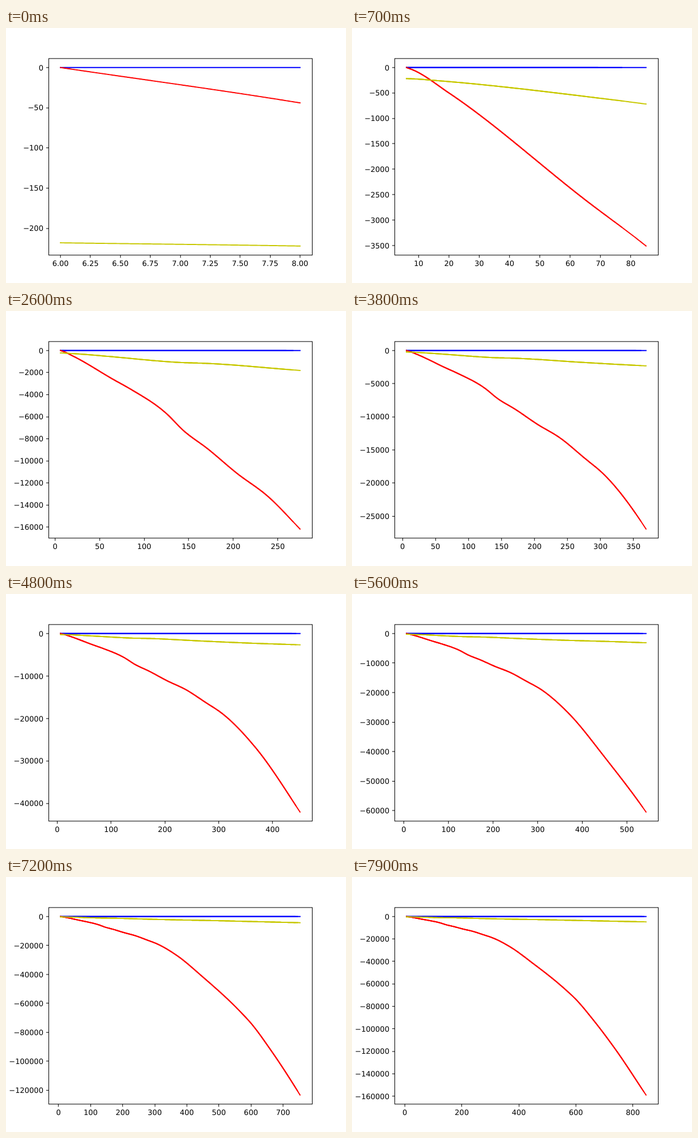
These frames come from a looping animation (600 px wide and 450 px high, 8000 ms). An HTML page:

```html
<!DOCTYPE html>
<html lang="en">
<head>
<meta charset="utf-8">
<title>Growing line chart</title>
<style>
  html, body { margin: 0; width: 100%; height: 100%; overflow: hidden; background: #fff; }
  svg { display: block; width: 600px; height: 450px; }
  text { font: 13.89px "DejaVu Sans", sans-serif; text-rendering: geometricPrecision; fill: #000; }
  .axis { fill: none; stroke: #000; stroke-width: 1.1; }
  .line { fill: none; stroke-width: 2.08; stroke-linejoin: round; stroke-linecap: square; }
</style>
</head>
<body>
<svg viewBox="0 0 640 480">
  <g id="lines"></g>
  <g id="ticks"></g>
  <rect class="axis" x="80.5" y="57.5" width="496" height="370"/>
</svg>
<script>
const FRAME_MS = 100, FRAMES = 80;
const BOX = { left: 80, right: 576, top: 57.6, bottom: 427.2 };
const START = 6, SAMPLES = 160;

// Smooth curve through key points, with tangents weighted by spacing
function curve(points) {
  const chord = i => (points[i + 1][1] - points[i][1]) / (points[i + 1][0] - points[i][0]);
  const last = points.length - 1;
  const slopes = points.map(([x], i) => {
    if (i === 0) return chord(0);
    if (i === last) return chord(last - 1);
    const before = x - points[i - 1][0], after = points[i + 1][0] - x;
    return (chord(i - 1) * after + chord(i) * before) / (before + after);
  });
  return x => {
    let i = 0;
    while (i < last - 1 && points[i + 1][0] < x) i++;
    const [x0, y0] = points[i], [x1, y1] = points[i + 1];
    const h = x1 - x0, t = (x - x0) / h, u = 1 - t;
    return u * u * ((1 + 2 * t) * y0 + t * h * slopes[i]) +
           t * t * ((1 + 2 * u) * y1 - u * h * slopes[i + 1]);
  };
}

// Right end of the data by frame
const endAt = curve([[0, 8], [15, 171], [26, 275], [38, 369], [48, 451], [65, 661], [79, 846]]);

const red = curve([
  [6, 0], [8, -44], [20, -500], [66, -2650], [85, -3510], [125, -5710], [144, -7240],
  [171, -8881], [204, -11110], [239, -13215], [275, -16167], [307, -18880], [369, -26947],
  [451, -42007], [562, -64700], [601, -74000], [661, -92060], [740, -118700], [846, -158940]
]);
const yellow = curve([
  [6, -218], [8, -222], [17, -262], [73, -627], [105, -870], [136, -1064], [171, -1168],
  [275, -1804], [369, -2314], [451, -2661], [661, -3785], [846, -4770]
]);
const SERIES = [
  { color: "#0000ff", at: () => 0 },
  { color: "#ff0000", at: red },
  { color: "#c8c800", at: yellow }
];

const linesEl = document.getElementById("lines");
const ticksEl = document.getElementById("ticks");

// Data range with 5% margins, mapped to pixels
function makeScale(min, max, from, to) {
  const pad = (max - min) * 0.05, lo = min - pad, hi = max + pad;
  return { lo, hi, map: v => from + (to - from) * (v - lo) / (hi - lo) };
}

// Round tick values, at most nine intervals
function tickList({ lo, hi }) {
  const raw = (hi - lo) / 9;
  const base = 10 ** Math.floor(Math.log10(raw));
  const step = base * [1, 2, 2.5, 5, 10].find(f => f * base >= raw);
  let digits = 0;
  while (Math.abs(step * 10 ** digits - Math.round(step * 10 ** digits)) > 1e-6) digits++;
  const list = [];
  for (let i = Math.ceil(lo / step); i * step <= hi; i++) {
    const v = i * step;
    list.push({ v, label: (v < 0 ? "\u2212" : "") + Math.abs(v).toFixed(digits) });
  }
  return list;
}

function linePath(at, end, sx, sy) {
  const spots = Array.from({ length: SAMPLES + 1 }, (_, i) => {
    const x = START + (end - START) * i / SAMPLES;
    return sx.map(x).toFixed(2) + " " + sy.map(at(x)).toFixed(2);
  });
  return "M" + spots.join("L");
}

const snap = v => Math.floor(v) + 0.5;

function draw(frame) {
  const end = Math.round(endAt(frame));
  const sx = makeScale(START, end, BOX.left, BOX.right);
  const sy = makeScale(Math.min(red(end), yellow(end)), 0, BOX.bottom, BOX.top);

  // Earlier plots stay beneath, so older parts look heavier
  let lines = "";
  for (let back = 16; back >= 0; back -= 8) {
    if (end - back <= START) continue;
    for (const { color, at } of SERIES)
      lines += `<path class="line" stroke="${color}" d="${linePath(at, end - back, sx, sy)}"/>`;
  }
  linesEl.innerHTML = lines;

  let ticks = "";
  for (const { v, label } of tickList(sx)) {
    const x = sx.map(v);
    ticks += `<path class="axis" d="M${snap(x)} 427.5v4.9"/>` +
      `<text x="${x.toFixed(2)}" y="447.5" text-anchor="middle">${label}</text>`;
  }
  for (const { v, label } of tickList(sy)) {
    const y = sy.map(v);
    ticks += `<path class="axis" d="M80.5 ${snap(y)}h-4.9"/>` +
      `<text x="70.3" y="${(y + 5.1).toFixed(2)}" text-anchor="end">${label}</text>`;
  }
  ticksEl.innerHTML = ticks;
}

const start = performance.now();
let current = -1;
function tick() {
  const frame = Math.floor((performance.now() - start) / FRAME_MS) % FRAMES;
  if (frame !== current) draw(current = frame);
  requestAnimationFrame(tick);
}
tick();
</script>
</body>
</html>
```
